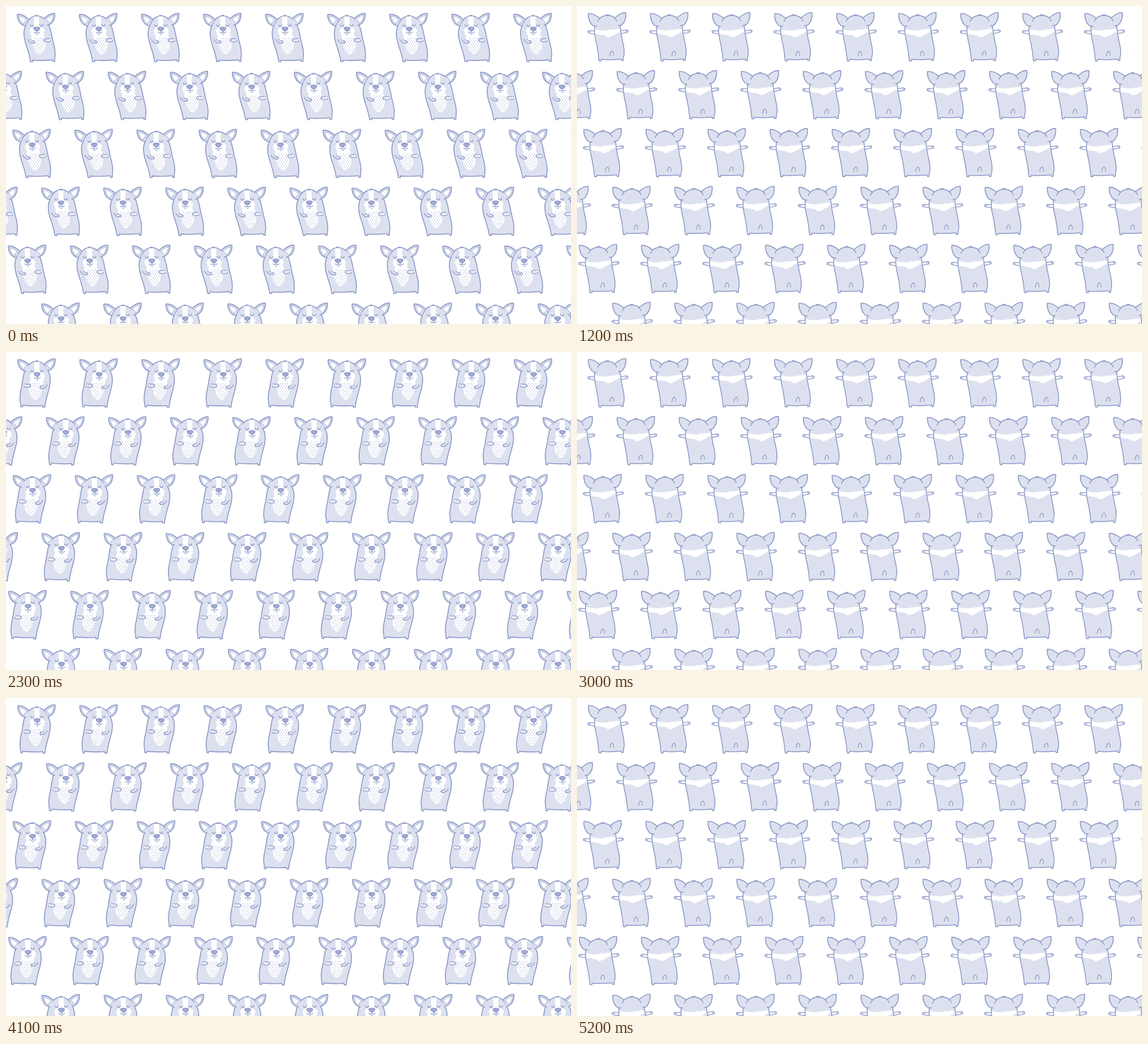
Write an HTML page with a canvas that moves like this. It is 998 px wide and 561 px high and loops after 5410 ms.

```html
<!DOCTYPE html>
<html lang="en">
<head>
<meta charset="utf-8">
<title>Dancing dogs</title>
<style>
html, body { margin: 0; width: 100%; height: 100%; overflow: hidden; background: #fff; }
canvas { display: block; width: 998px; height: 561px; }
</style>
</head>
<body>
<canvas id="stage" width="998" height="561"></canvas>
<script>
const ctx = document.getElementById('stage').getContext('2d');
const LOOP = 5410, DANCE = 1800;
const LINE = '#8a97c6', FUR = '#dde1ef', NOSE = '#a0abd3', WHITE = '#fff';
const COL = 109.63, ROW = 102.2;
const ROW_SHIFT = [0, 50.8, -8, 43, -16, 43];
const HEAD_TILT = -0.025;

const shape = d => new Path2D(d);

const front = {
  body: shape('M32.5 36C29.5 42 29 50 30 57C31.5 70 37 80 38.5 95L39 98.3L42.5 98.3L43 95.5C55 97 66 96 78 95L79 98L81.7 97.5L82 92C84 85 82.5 72 80 62C78 52 78 45 75 36C70 21.5 60 17.5 54 17.5C47 17.5 38 21.5 32.5 36Z'),
  belly: shape('M43 50C40.5 62 44 80 54.5 85.5C64 84 67.5 72 67 62C67 57 66 53 64 50Z'),
  face: shape('M49 18.5C50 25 50 31 48 36C44 37 41 41 41 45L43 46.5L42 50L45 51L45 54.5L49 56L60 56L63 54L64 51L67 50L66 46.5L68 45C68 41 64 37 60 36C58 31 58 25 59 18.5Z'),
  arm: shape('M35 59C37 63 41 65.8 45 65.8C48.5 65.3 48.5 62 45.5 61.5C43.5 61.5 42 60.5 41 59'),
  paw: shape('M75 57.5L66 58C63.6 58.5 63.6 62.5 66 63.2L72 63C74.5 63.2 76 62 76 60.2'),
  toes: shape('M65 60.5L67.5 60.5M70.5 60.2L71.5 60.2'),
  inner: shape('M36.5 24C31 19.5 27 17.5 23.3 17C23.5 22 26 28 31 31.2C32 28 33.5 26 36.5 24Z'),
  nose: shape('M48.7 39C50 36.6 58 36.6 59.3 39C59.6 41.5 56.5 44.3 54 44.3C52 44.3 48.4 41.5 48.7 39Z'),
  mouth: shape('M49 45.8C50 48.4 53.5 48.4 54.2 46C55 48.4 58.5 48.4 59.5 45.8M54.2 44.3L54.2 46M53 50.3L55.5 50.3'),
  eyes: shape('M43.2 33C43.7 36.8 48 36.8 48.5 33M59.5 33C60 36.8 64.5 36.8 65 33')
};

const back = {
  body: shape('M31 39C30 50 33 62 35 70C37 80 38 88 38.5 95L39 98.3L42.5 98.3L43 95.5C55 97 66 96 78 95L79 98L81.7 97.5L82 92C85 85 82.5 72 80 62C78 52 77 46 76.5 39C75 24 62 18 54 18C45 18 34 24 31 39Z'),
  band: shape('M28 43.5L37 43Q39 45.5 41 43.5Q44 46 47 44Q50 46 53 44Q56 45 58 42.5Q61 44.5 64 42.5Q67 43.5 69 41.5Q73 43 80 40.5L80 45C73 48 68 51 62 54.5L55 57L49 53.5C43 52 37 51.5 28 50.5Z'),
  arms: shape('M33 45.6L22 44.8C18 45.3 18.3 48.7 22 49.2L33 51.3M76 45.2L87 43.6C91 43.6 91 48 87 48.2L77 50.2'),
  fingers: shape('M19.5 47L24 47M89.5 45.7L85.5 46'),
  tail: shape('M58 89C58.5 83 61 80.3 62.6 81.3C64.6 83 65 86.5 64.3 88.6')
};

const ear = shape('M39.5 22.3C33 16.5 26 13.3 20.5 14C20 20 22.5 28 27 31.3C29 33 32 34.3 34 34.5');
const backEar = shape('M40.5 23C33 16.5 26 13.3 20.5 14C20 21 22 29 26.5 34C28.5 36 31 37 34 36.5');
const earFold = shape('M40.5 23C38.5 24.5 37.2 26 36.8 28.5');
const tuft = shape('M50.5 17.8L52.8 16.2L53.6 17.4L55.2 16L57 17.8');

const chestHair = new Path2D();
for (let row = 0; row < 9; row++) {
  const y = 53 + row * 3.4;
  const half = 11.5 * Math.sqrt(1 - ((y - 65) / 19) ** 2);
  for (let x = -12 + (row % 2) * 2.2; x < 12; x += 4.4) {
    if (Math.abs(x) > half - 1) continue;
    chestHair.moveTo(54 + x, y);
    chestHair.lineTo(54.3 + x, y + 1.5);
  }
}

function fill(path, color) {
  ctx.fillStyle = color;
  ctx.fill(path);
}

function stroke(path, width = 1.5, color = LINE) {
  ctx.lineWidth = width;
  ctx.strokeStyle = color;
  ctx.stroke(path);
}

function draw(path, color, width) {
  fill(path, color);
  stroke(path, width);
}

function isolate(paint) {
  ctx.save();
  paint();
  ctx.restore();
}

function mirror() {
  ctx.transform(-1, 0, 0, 1, 107, 0);
}

function bothSides(paint) {
  paint();
  isolate(() => {
    mirror();
    paint();
  });
}

function tiltHead() {
  ctx.translate(53.5, 30);
  ctx.rotate(HEAD_TILT);
  ctx.translate(-53.5, -30);
}

function frontBody(lean) {
  ctx.transform(1, 0, lean, 1, 0, 0);
  fill(front.body, FUR);
  fill(front.belly, WHITE);
  stroke(front.body, 1.6);
  stroke(chestHair, 0.8, '#a9b3d7');
  draw(front.arm, FUR, 1.3);
  draw(front.paw, WHITE, 1.3);
  stroke(front.toes, 1);
}

function frontHead() {
  fill(front.face, WHITE);
  bothSides(() => {
    draw(ear, FUR, 1.7);
    draw(front.inner, WHITE, 0.8);
  });
  stroke(tuft, 1);
  draw(front.nose, NOSE, 1.2);
  stroke(front.mouth, 1.2);
  stroke(front.eyes, 1.4);
}

function backBody() {
  draw(back.arms, WHITE, 1.3);
  stroke(back.fingers, 0.9);
  fill(back.body, FUR);
  isolate(() => {
    ctx.clip(back.body);
    fill(back.band, WHITE);
  });
  stroke(back.body, 1.5);
  stroke(back.tail, 1.3);
}

function backHead() {
  bothSides(() => {
    draw(backEar, FUR, 1.6);
    stroke(earFold, 1.4);
  });
  stroke(tuft, 1);
}

// Only the body changes sides; the head keeps its tilt.
const poses = {
  frontRight: { body: () => frontBody(0.045), head: frontHead, flip: false, dx: 0, dy: 0 },
  frontLeft: { body: () => frontBody(0), head: frontHead, flip: true, dx: 0.7, dy: -1 },
  backLeft: { body: backBody, head: backHead, flip: true, dx: 0.7, dy: -1 },
  backRight: { body: backBody, head: backHead, flip: false, dx: 0, dy: -1.4 }
};

function poseAt(time) {
  const t = Math.min(time % LOOP, LOOP - 11) % DANCE;
  if (t < 500) return poses.frontRight;
  if (t < 1000) return poses.frontLeft;
  return Math.floor((t - 1000) / 200) % 2 ? poses.backRight : poses.backLeft;
}

function drawDog(pose, x, y) {
  ctx.translate(x + pose.dx, y + pose.dy);
  isolate(() => {
    if (pose.flip) mirror();
    pose.body();
  });
  tiltHead();
  pose.head();
}

function render(pose) {
  ctx.fillStyle = WHITE;
  ctx.fillRect(0, 0, 998, 561);
  ctx.lineCap = ctx.lineJoin = 'round';
  ROW_SHIFT.forEach((shift, row) => {
    const first = row < 5 ? -1 : 0;
    for (let col = first; col < 10; col++) {
      isolate(() => drawDog(pose, col * COL + shift, row * ROW));
    }
  });
}

const start = performance.now();
let shown = null;

function tick() {
  const pose = poseAt(performance.now() - start);
  if (pose !== shown) render(shown = pose);
  requestAnimationFrame(tick);
}
tick();
</script>
</body>
</html>
```
